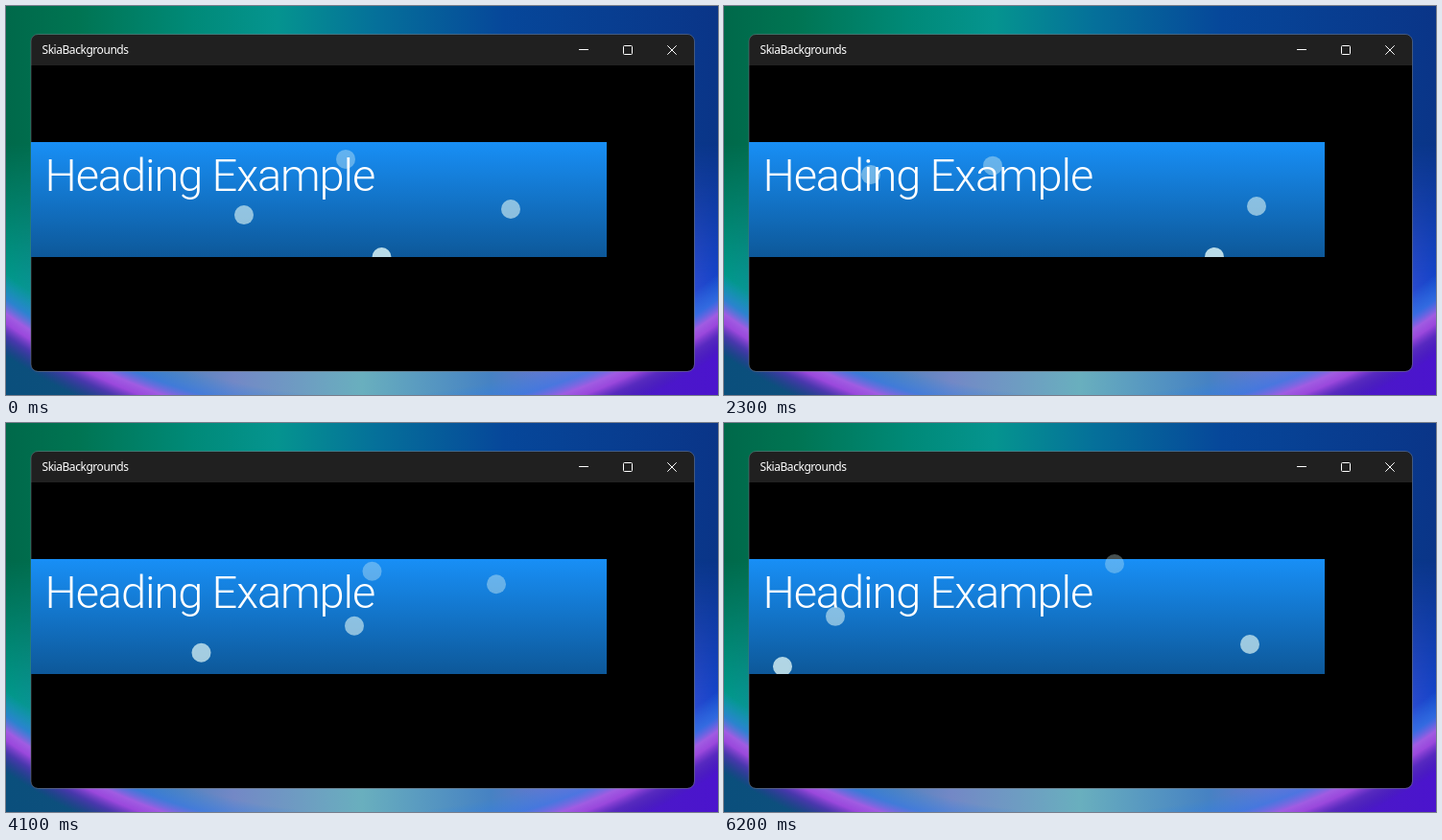
These frames come from a looping animation (742 by 406 pixels, 6.3 s). An HTML page:

```html
<!DOCTYPE html>
<html lang="en">
<head>
<meta charset="utf-8">
<title>SkiaBackgrounds</title>
<style>
  html, body { margin: 0; width: 100%; height: 100%; overflow: hidden; background: #000; }
  svg { display: block; width: 742px; height: 406px; }
  text { fill: #fff; }
  .title { font: 12px "Noto Sans", "Open Sans", sans-serif; letter-spacing: -.45px; }
  .heading { font: 300 47px Roboto, "Open Sans", sans-serif; letter-spacing: -1.1px; }
  .icons { fill: none; stroke: #fff; }
</style>
</head>
<body>
<svg viewBox="0 0 742 406">
  <defs>
    <linearGradient id="base">
      <stop offset="0" stop-color="#00694a"/>
      <stop offset=".1" stop-color="#007452"/>
      <stop offset=".26" stop-color="#008a78"/>
      <stop offset=".38" stop-color="#05948f"/>
      <stop offset=".52" stop-color="#05709a"/>
      <stop offset=".7" stop-color="#06479a"/>
      <stop offset="1" stop-color="#0a3588"/>
    </linearGradient>
    <linearGradient id="floor">
      <stop offset="0" stop-color="#00a69c"/>
      <stop offset=".15" stop-color="#2b7cb4"/>
      <stop offset=".32" stop-color="#7388c6"/>
      <stop offset=".5" stop-color="#69afbe"/>
      <stop offset=".68" stop-color="#4682c3"/>
      <stop offset=".84" stop-color="#8a68dc"/>
      <stop offset="1" stop-color="#1848dc"/>
    </linearGradient>
    <linearGradient id="corner">
      <stop offset="0" stop-color="#0a4f7c"/>
      <stop offset=".3" stop-color="#14507f"/>
      <stop offset=".7" stop-color="#4a20c0"/>
      <stop offset="1" stop-color="#4b14cd"/>
    </linearGradient>
    <linearGradient id="fade" x2="0" y2="1">
      <stop offset=".35" stop-color="#000"/>
      <stop offset=".8" stop-color="#fff"/>
    </linearGradient>
    <mask id="low"><rect width="742" height="406" fill="url(#fade)"/></mask>
    <radialGradient id="rim" gradientUnits="userSpaceOnUse" cx="371" cy="-195" r="700">
      <stop offset=".86" stop-color="#2f86e0" stop-opacity="0"/>
      <stop offset=".89" stop-color="#3a78e4" stop-opacity=".7"/>
      <stop offset=".908" stop-color="#a05ce2"/>
      <stop offset=".92" stop-color="#9a48dc"/>
      <stop offset=".935" stop-color="#5c30bc" stop-opacity=".75"/>
      <stop offset=".96" stop-color="#4028a0" stop-opacity="0"/>
    </radialGradient>
    <linearGradient id="blue" x2="0" y2="1">
      <stop offset="0" stop-color="#188ff6"/>
      <stop offset="1" stop-color="#0d5899"/>
    </linearGradient>
    <clipPath id="sphere"><circle cx="371" cy="-195" r="642"/></clipPath>
    <clipPath id="above"><rect x="26" y="62" width="600" height="200"/></clipPath>
  </defs>

  <rect width="742" height="406" fill="url(#corner)"/>
  <g clip-path="url(#sphere)">
    <rect width="742" height="406" fill="url(#base)"/>
    <rect width="742" height="406" fill="url(#floor)" mask="url(#low)"/>
  </g>
  <rect width="742" height="406" fill="url(#rim)"/>

  <rect x="26" y="30" width="691" height="351" rx="7"/>
  <path d="M26 62V37a7 7 0 0 1 7-7H710a7 7 0 0 1 7 7V62Z" fill="#202020"/>
  <rect x="26" y="29.5" width="691.5" height="352" rx="7.5" fill="none" stroke="#6b7078" stroke-opacity=".6"/>
  <text class="title" x="37.5" y="50">SkiaBackgrounds</text>
  <g class="icons">
    <path d="M597 45.5h10M689.3 41.3l9.4 9.4m0-9.4l-9.4 9.4"/>
    <rect x="643.5" y="41.5" width="9" height="9" rx="1"/>
  </g>

  <rect x="26" y="142" width="600" height="120" fill="url(#blue)"/>
  <g id="bubbles" clip-path="url(#above)" fill="#d8f2f4"></g>
  <text class="heading" x="40.5" y="193">Heading Example</text>
</svg>
<script>
  const LOOP = 6300, STEP = 100, LIFE = 1890, START_Y = 262;

  // x, birth time in ms, rise in px per second
  const bubbles = [
    [354, -1620, 63], [526, -1000, 50], [248, -566, 77.6], [391.5, 0, 79],
    [153, 628, 51.4], [280, 1078, 78], [555, 1618, 77.7], [511, 2298, 52],
    [381.5, 2716, 77.5], [363, 3322, 64.6], [203.5, 3815, 78], [407, 4422, 64.7],
    [116, 4985, 49.5], [548, 5572, 49.4], [61, 6075, 64]
  ].map(([x, birth, rise]) => {
    const dot = document.createElementNS("http://www.w3.org/2000/svg", "circle");
    dot.setAttribute("cx", x);
    dot.setAttribute("r", 10);
    document.getElementById("bubbles").append(dot);
    return { dot, birth, rise };
  });

  function draw(now) {
    const t = Math.floor(now % LOOP / STEP) * STEP;
    for (const { dot, birth, rise } of bubbles) {
      const age = t - birth;
      const y = START_Y - rise * age / 1000;
      const alive = age >= 0 && age < LIFE;
      dot.setAttribute("cy", y);
      dot.setAttribute("opacity", alive ? .0045 * (y - 74) : 0);
    }
  }

  const origin = performance.now();
  function tick() {
    draw(performance.now() - origin);
    requestAnimationFrame(tick);
  }
  tick();
</script>
</body>
</html>
```
